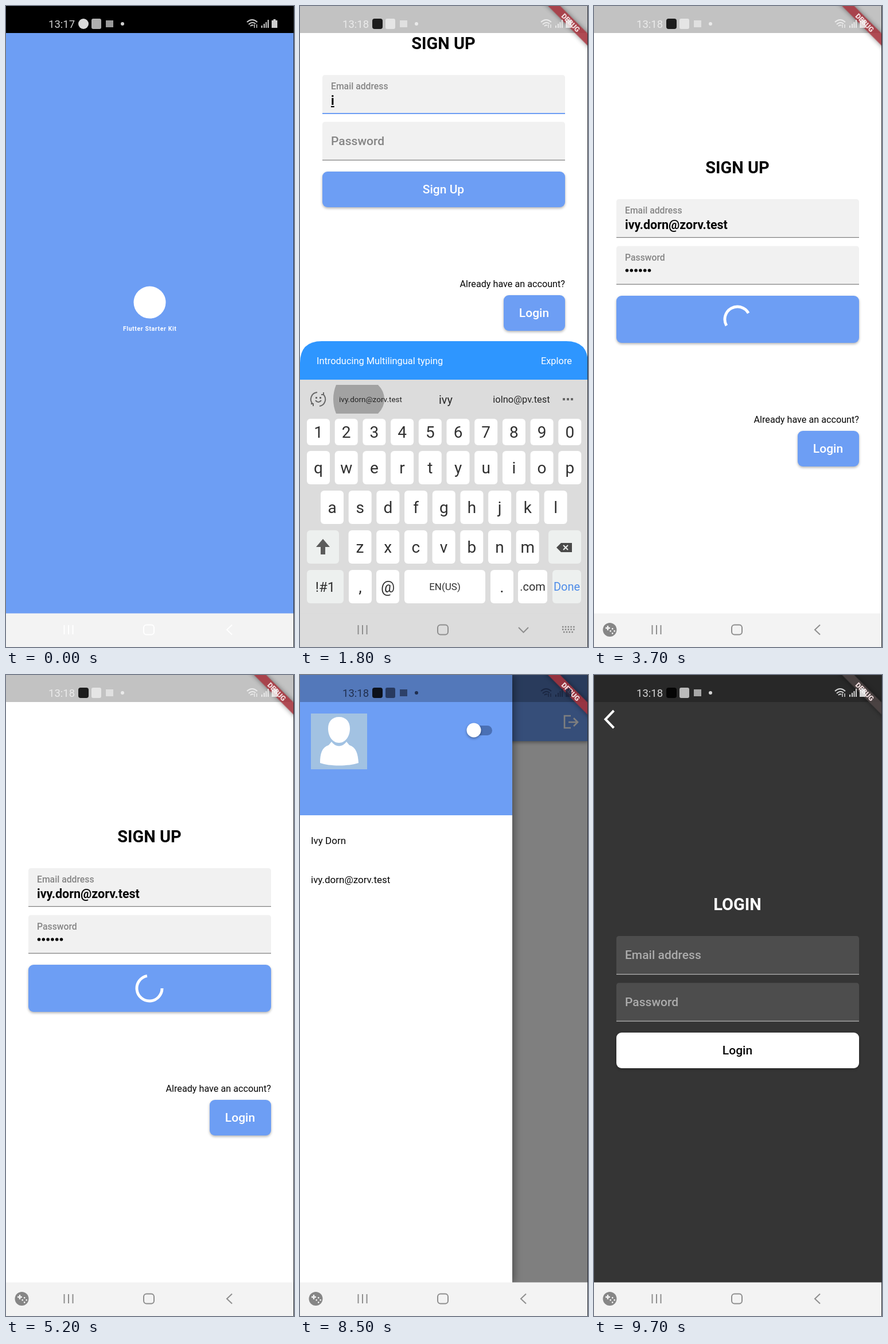
Write an HTML page that moves like this. It is 502x1115 px and loops after 9800 ms.

```html
<!DOCTYPE html>
<html lang="en">
<head>
<meta charset="utf-8">
<title>Starter kit demo</title>
<style>
html, body { margin: 0; width: 100%; height: 100%; overflow: hidden; background: #fff; }
svg { display: block; width: 502px; height: 1115px; font-family: Roboto, sans-serif;
  --page: #fff; --ink: #060606; --field: #f1f1f1; --hint: #858585; --line: #7d7d7d;
  --brand: #6d9ef4; --btn: #6d9ef4; --btnText: #fff; --band: #a5323c; }
svg.dark { --page: #353535; --ink: #fff; --field: #4d4d4d; --hint: #acacac; --line: #b8b8b8;
  --brand: #242424; --btn: #fff; --btnText: #060606; --band: #4d4444; }
.brand { fill: var(--brand); }
.page { fill: var(--page); }
.ink { fill: var(--ink); }
.title { font-size: 29px; font-weight: 700; }
.field { fill: var(--field); }
.hint { fill: var(--hint); font-size: 21px; font-weight: 500; }
.line { fill: var(--line); }
.focus .line { fill: #6d9ef4; height: 2px; }
.value { font-size: 21.5px; font-weight: 700; }
.btn { fill: var(--btn); filter: drop-shadow(0 2px 2px rgba(0,0,0,.3)); }
.btnText { fill: var(--btnText); font-size: 21px; font-weight: 500; }
.small { font-size: 17px; }
.mid { text-anchor: middle; }
.stroke { fill: none; stroke: currentColor; stroke-width: 2; }
.arc { fill: none; stroke: #fff; stroke-width: 4.9; }
.key { fill: #fff; }
.key.alt { fill: #edf0ef; }
.cap { fill: #303030; }
</style>
</head>
<body>
<svg id="stage" viewBox="0 0 502 1115" width="502" height="1115">
  <g id="splash">
    <rect width="502" height="1057" fill="#6d9ef4"/>
    <g id="logo" fill="#fff">
      <circle cx="250.5" cy="492" r="78"/>
      <text x="251" y="630" class="mid" font-size="29" font-weight="700" letter-spacing="1.8">Flutter Starter Kit</text>
    </g>
  </g>

  <g id="signup"></g>
  <g id="login"></g>

  <g id="home">
    <rect width="502" height="1057" class="page"/>
    <rect width="502" height="115" class="brand" style="filter:drop-shadow(0 2px 3px rgba(0,0,0,.4))"/>
    <path d="M472 71H461V92H472M468 82H483M477 75L484 82L477 89" fill="none" stroke="#fff" stroke-width="2.6"/>
    <rect id="scrim" width="502" height="1057"/>
    <g id="drawer">
      <rect width="370" height="1057" class="page" style="filter:drop-shadow(3px 0 7px rgba(0,0,0,.4))"/>
      <rect width="370" height="244" class="brand"/>
      <g id="loading">
        <circle cx="68.5" cy="115.5" r="46.5" fill="#fff"/>
        <path id="avatarArc" class="arc"/>
      </g>
      <g id="avatar">
        <rect x="19" y="67" width="98" height="97" fill="#a2c2e2"/>
        <path fill="#fff" d="M68 73C80 73 87 81 87 93C87 107 79 118 68 118C57 118 49 107 49 93C49 81 56 73 68 73Z
          M35 153C35 137 38 126 50 122L55 116C62 126 74 126 81 116L86 122C98 126 101 137 102 153C84 159 52 159 35 153Z"/>
      </g>
      <rect x="296" y="88" width="39" height="17" rx="8.5" fill="#4a70b5"/>
      <circle id="thumb" cx="303" cy="96" r="12.5" fill="#fff" style="filter:drop-shadow(0 2px 2px rgba(0,0,0,.35))"/>
      <text x="19" y="294" class="ink small">Ivy Dorn</text>
      <text x="19" y="362" class="ink small">ivy.dorn@zorv.test</text>
    </g>
  </g>

  <g id="keyboard">
    <path d="M0 650V621Q0 583 38 583H464Q502 583 502 621V650Z" fill="#2e96ff"/>
    <text x="29" y="623" fill="#fff" font-size="16.4">Introducing Multilingual typing</text>
    <text x="474" y="623" fill="#fff" font-size="16.4" text-anchor="end">Explore</text>
    <rect y="650" width="502" height="465" fill="#dcdcdc"/>
    <g id="suggest" fill="#252525">
      <path id="pill" d="M63 659H136Q147 670 147 684T136 709H63Q58 697 58 684T63 659Z" fill="#a2a2a2"/>
      <text x="123" y="689" class="mid" font-size="13.5">ivy.dorn@zorv.test</text>
      <text x="254" y="692" class="mid" font-size="20">ivy</text>
      <text x="386" y="690" class="mid" font-size="16.5">iolno@pv.test</text>
    </g>
    <g color="#686868">
      <path class="stroke" d="M22 692A12 12 0 0 1 30 672M34 696A12 12 0 0 0 41 676M19 692H23V696M37 676H41V672M27 686Q32 692 37 686"/>
      <path d="M27 680h3v3h-3zM34 680h3v3h-3z" fill="currentColor"/>
      <path d="M458 682h4v4h-4zM465 682h4v4h-4zM472 682h4v4h-4z" fill="currentColor"/>
    </g>
    <g id="keys"></g>
    <path d="M40 927L52 941H44V954H36V941H28Z" fill="#5c5c5c"/>
    <path d="M447 942L455 934H474V950H455Z" fill="#4a4a4a"/>
    <path d="M459 938L467 946M467 938L459 946" stroke="#edf0ef" stroke-width="2"/>
  </g>

  <g id="nav">
    <rect id="navBg" y="1056.5" width="502" height="59"/>
    <g id="navIcons">
      <path class="stroke" d="M101.5 1077V1093M109 1077V1093M116.5 1077V1093"/>
      <rect class="stroke" x="240" y="1076.5" width="18" height="17" rx="5"/>
      <path id="navBack" class="stroke"/>
    </g>
    <g id="game">
      <circle cx="27.5" cy="1085" r="12" fill="#868686"/>
      <path d="M20 1082H28M24 1078V1086" stroke="#f3f3f3" stroke-width="2.4"/>
      <path d="M31 1082h2.4v2.4h-2.4zM27.5 1086h2.4v2.4h-2.4zM34.500 1086h2.4v2.4h-2.4zM31 1090h2.4v2.4h-2.4z" fill="#f3f3f3"/>
    </g>
    <path id="navKeys" d="M457 1080H479M457 1084.5H479M459 1089H477" stroke="#858585" stroke-width="2.4" stroke-dasharray="2.4 2.4"/>
  </g>

  <rect id="tint" width="502" height="47"/>
  <g id="banner">
    <g transform="translate(472 29) rotate(45)">
      <rect x="-80" y="-7.5" width="160" height="15" fill="var(--band)" opacity=".88" style="filter:drop-shadow(0 0 4px rgba(0,0,0,.5))"/>
      <text y="4.5" class="mid" fill="#f3dfe0" font-size="12.4" font-weight="900">DEBUG</text>
    </g>
  </g>
  <g id="status" opacity=".85">
    <text id="clock" x="74" y="38" font-size="18.5" fill="currentColor"></text>
    <rect id="app" x="126" y="22" width="18" height="18"/>
    <rect x="149" y="22" width="17" height="18" rx="3" fill="currentColor" opacity=".85"/>
    <rect x="174" y="25" width="13" height="12" fill="currentColor" opacity=".75"/>
    <circle cx="203" cy="31" r="3" fill="currentColor"/>
    <path class="stroke" d="M420 28Q429 20 438 28M423 32Q429 26 435 31M426 35Q429 32 431 34"/>
    <path d="M433 32V38M437 38V32" stroke="currentColor" stroke-width="1.5"/>
    <path d="M445 34h2v4h-2zM449 31h2v7h-2zM452.5 28h2v10h-2zM456 24h2v14h-2z" fill="currentColor"/>
    <path d="M466 23h4v2h3v13h-10v-13h3z" fill="currentColor"/>
  </g>
  <rect x="501" width="1" height="1115" fill="#2a2d33"/>
</svg>

<script>
const LOOP = 9800;
const $ = id => document.getElementById(id);
const set = (id, attrs) => { for (const name in attrs) $(id).setAttribute(name, attrs[name]); };
const show = (id, on) => { $(id).style.display = on ? '' : 'none'; };
const move = (id, x, y) => set(id, { transform: `translate(${x} ${y})` });
const smooth = x => x * x * (3 - 2 * x);
const ramp = (t, a, b) => smooth(Math.min(1, Math.max(0, (t - a) / (b - a))));
const within = (t, a, b) => t >= a && t < b;

// Form parts are placed relative to the middle of the title.
const field = (id, y, label) => `
  <g id="${id}" transform="translate(0 ${y})">
    <path d="M39 67V5Q39 0 44 0H457Q462 0 462 5V67Z" class="field"/>
    <rect x="39" y="66" width="423" height="1.2" class="line"/>
    <text id="${id}Hint" x="54" class="hint">${label}</text>
    <text id="${id}Value" x="54" y="52" class="ink value"></text>
  </g>`;

const form = (name, title, action) => `
  <rect width="502" height="1057" class="page"/>
  <g id="${name}Form">
    <text x="250" y="10.5" class="mid ink title">${title}</text>
    ${field(name + 'Email', 56, 'Email address')}
    ${field(name + 'Pass', 137.5, 'Password')}
    <rect id="${name}Button" x="39" y="224" width="423" height="62" rx="9" class="btn"/>
    <text id="${name}Action" x="250" y="262" class="mid btnText">${action}</text>
  </g>`;

$('signup').innerHTML = form('signup', 'SIGN UP', 'Sign Up');
$('login').innerHTML = form('login', 'LOGIN', 'Login') +
  '<path d="M34.5 62L20 77L34.5 92" fill="none" stroke="#fff" stroke-width="4"/>';
$('signupForm').insertAdjacentHTML('beforeend', `
  <path id="busyArc" class="arc"/>
  <g id="dots" class="ink"></g>
  <g id="switch">
    <text x="462" y="425" text-anchor="end" class="ink" font-size="16.2">Already have an account?</text>
    <rect x="355" y="439" width="107" height="62" rx="9" class="btn"/>
    <text x="408" y="477" class="mid btnText">Login</text>
  </g>`);
for (let i = 0; i < 6; i++) {
  $('dots').innerHTML += `<circle cx="${57.5 + 7.8 * i}" cy="180" r="2.8"/>`;
}
move('loginForm', 0, 398);

const key = (x, y, w, h, text, size = 28, style = '') => {
  $('keys').innerHTML += `<rect x="${x}" y="${y}" width="${w}" height="${h}" rx="6" class="key ${style}"/>
    <text x="${x + w / 2}" y="${y + h / 2 + size * .36}" font-size="${size}" class="mid cap"
      ${text === 'Done' ? 'style="fill:#4d8be8"' : ''}>${text}</text>`;
};
[['1234567890', 12, 718, 46], ['qwertyuiop', 12, 774, 58],
 ['asdfghjkl', 36, 843, 58], ['zxcvbnm', 84.5, 912, 58]].forEach(([row, x, y, h]) =>
  [...row].forEach((c, i) => key(x + 48.7 * i, y, 40, h, c)));
key(12, 912, 56, 58, '', 28, 'alt');
key(433, 912, 57, 58, '', 28, 'alt');
[[12, 64, '!#1', 24, 'alt'], [85, 40, ',', 28], [133, 40, '@', 27], [182, 141, 'EN(US)', 17],
 [332, 40, '.', 28], [380, 51, '.com', 20], [440, 50, 'Done', 20, 'alt']].forEach(
  ([x, w, text, size, style]) => key(x, 981, w, 58, text, size, style));

// Indeterminate ring: the head runs ahead, then the tail catches up.
function ring(id, cx, cy, r, phase, start, elapsed) {
  const cycle = phase + elapsed / 1333, p = cycle % 1;
  const head = smooth(Math.min(1, 2 * p)), tail = smooth(Math.max(0, 2 * p - 1));
  const from = start + elapsed * .2 + 270 * (Math.floor(cycle) + tail);
  const sweep = 5 + 270 * (head - tail);
  const point = deg => {
    const a = deg * Math.PI / 180;
    return `${cx + r * Math.cos(a)} ${cy + r * Math.sin(a)}`;
  };
  set(id, { d: `M${point(from)}A${r} ${r} 0 ${+(sweep > 180)} 1 ${point(from + sweep)}` });
}

function fill(id, floating, focused, value) {
  set(id + 'Hint', { y: floating ? 25 : 40 });
  $(id + 'Hint').style.fontSize = floating ? '15.75px' : '';
  $(id).classList.toggle('focus', focused);
  $(id + 'Value').textContent = value;
}

function drawSignup(t) {
  const kb = ramp(t, 1250, 1500) - ramp(t, 3500, 3700);
  const busy = within(t, 3600, 5600);
  const grow = busy ? 20 : 0;
  const used = t < 5600;
  const email = !used || t < 1700 ? '' : t < 1900 ? 'i' : 'ivy.dorn@zorv.test';
  const typed = used ? Math.max(0, Math.min(6, Math.floor((t - 2300) / 180))) : 0;
  const onEmail = within(t, 1200, 2100), onPass = within(t, 2100, 3500);

  move('signupForm', 0, (290 - grow / 2) * (1 - kb) + 64 * kb);
  fill('signupEmail', onEmail || email !== '', onEmail, email);
  fill('signupPass', onPass || typed > 0, onPass, '');
  $('signupEmailValue').style.textDecoration = email === 'i' ? 'underline' : 'none';
  [...$('dots').children].forEach((dot, i) => { dot.style.display = i < typed ? '' : 'none'; });
  set('signupButton', { height: 62 + grow });
  move('switch', 0, grow);
  show('signupAction', !busy);
  show('busyArc', busy);
  if (busy) ring('busyArc', 250, 265, 22, .3 + 2, 150 - 540, t - 3700);

  show('keyboard', kb > 0);
  move('keyboard', 0, 532 * (1 - kb));
  show('suggest', within(t, 1700, 2100));
  show('pill', within(t, 1800, 1900));
  return kb > .3;
}

function drawHome(t) {
  const open = ramp(t, 5850, 6080) - ramp(t, 8900, 9120);
  move('drawer', -390 * (1 - open), 0);
  set('scrim', { opacity: open * .5 });
  set('thumb', { cx: 303 + 25 * ramp(t, 8550, 8700) });
  show('avatar', t >= 8400);
  show('loading', t < 8400);
  ring('avatarArc', 68.5, 115.5, 46.5, .18 + 1, -12 - 270, t - 6100);
}

function draw(t) {
  const home = within(t, 5600, 9300), dark = t >= 8700;
  $('stage').classList.toggle('dark', dark);
  show('splash', t < 1000);
  show('signup', within(t, 1000, 5600) || within(t, 9300, 9700));
  show('home', home);
  show('login', t >= 9700);

  const scale = .359 + .641 * ramp(t, 0, 600);
  set('logo', { transform: `translate(250.5 528.7) scale(${scale}) translate(-250.5 -528.7)` });
  fill('loginEmail', false, false, '');
  fill('loginPass', false, false, '');
  const typing = drawSignup(t);
  if (home) drawHome(t);

  const first = t < 100;
  set('tint', { opacity: first ? 1 : .24 });
  set('app', { rx: first ? 9 : 4, fill: first ? '#fff' : '#000' });
  show('banner', !first);
  $('clock').textContent = t < 1100 ? '13:17' : '13:18';
  $('status').style.color = home && !dark ? '#18233d' : '#f2f2f2';

  set('navBg', { fill: typing ? '#dcdcdc' : '#f3f3f3' });
  $('navIcons').style.color = first ? '#fff' : '#8e8e8e';
  set('navBack', { d: typing ? 'M381 1081L389.5 1089.5L398 1081' : 'M394 1076.5L385 1085L394 1093.5' });
  show('game', !first && !typing);
  show('navKeys', typing);
}

const begin = performance.now();
function tick() {
  draw((performance.now() - begin) % LOOP);
  requestAnimationFrame(tick);
}
tick();
</script>
</body>
</html>
```
